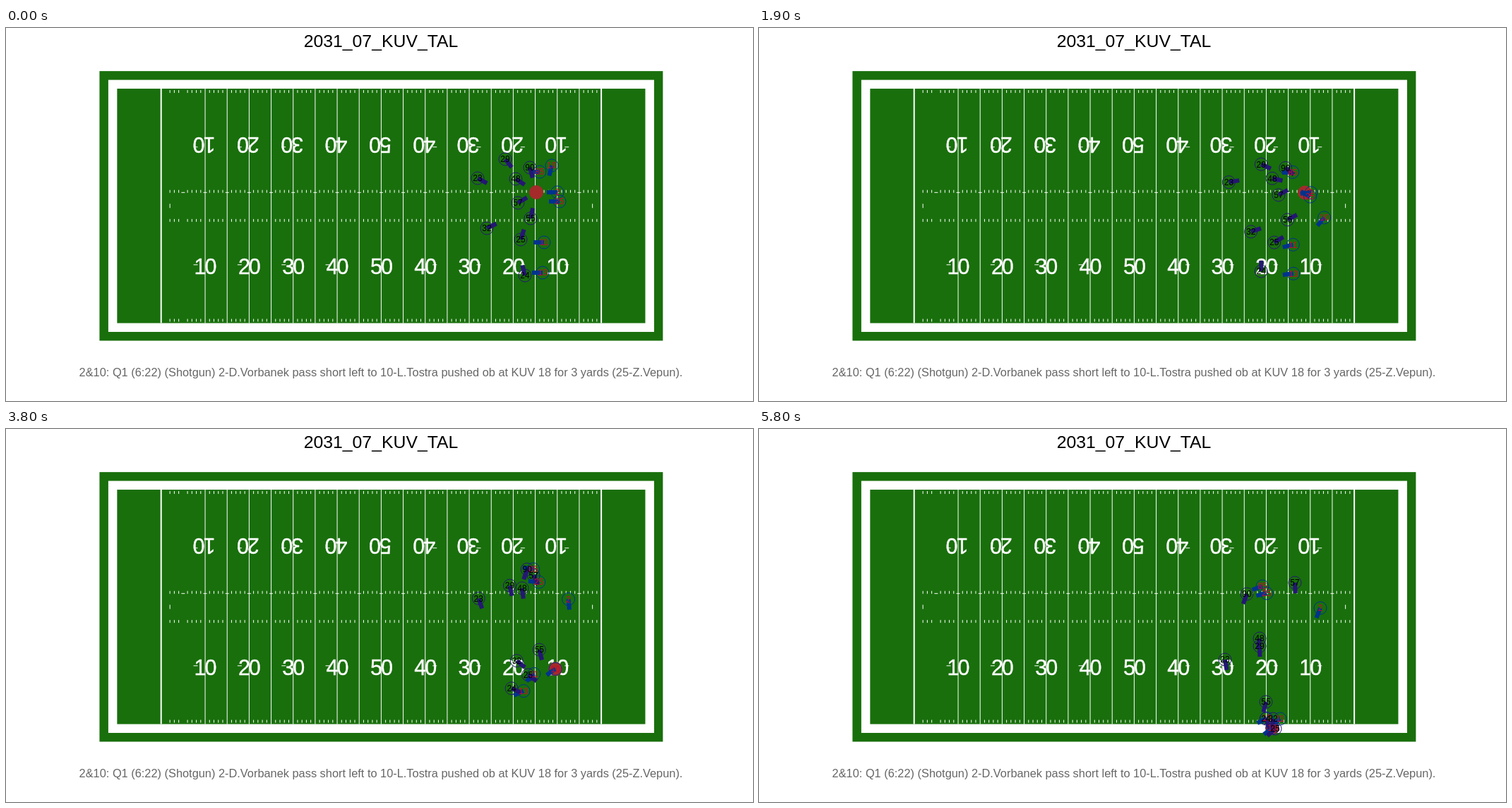
An HTML page for the animation above (5900 ms loop, 1058 by 529 pixels).

```html
<!DOCTYPE html>
<html lang="en">
<head>
<meta charset="utf-8">
<title>Play animation</title>
<style>
  html, body { margin: 0; width: 100%; height: 100%; overflow: hidden; background: #fff; }
  svg { display: block; width: 100vw; height: 100vh; }
  text { font-family: "Liberation Sans", Arial, sans-serif; text-anchor: middle; }
  .yards { font-size: 30.5px; letter-spacing: -2px; fill: #fff; stroke: #fff; stroke-width: 0.4; }
  .jersey { font-size: 12px; }
</style>
</head>
<body>
<svg id="stage" viewBox="0 0 1058 529"></svg>
<script>
const LOOP = 5900, STEP = 100;
const SNAP = 1400, PASS = 2600, CATCH = 3300, BLOCK = 4300;
const KNOTS = [0, SNAP, PASS, BLOCK, LOOP - STEP];
const YARD = 6.234, CENTER = { x: 531.4, y: 252.3 };
const GRASS = '#196f0c';
const DEFENSE = { color: '#241773', text: '#000' };
const OFFENSE = { color: '#00338d', text: '#c60c30' };
const stage = document.getElementById('stage');

function add(parent, tag, attrs = {}, text) {
  const el = document.createElementNS('http://www.w3.org/2000/svg', tag);
  for (const key in attrs) el.setAttribute(key, attrs[key]);
  if (text) el.textContent = text;
  parent.append(el);
  return el;
}

// Field, measured from its centre
const field = add(stage, 'g', { transform: `translate(${CENTER.x} ${CENTER.y})` });
const halfWidth = 60 * YARD, halfHeight = 160 / 6 * YARD;
const yardX = yard => (yard - 50) * YARD;

function turf(margin, fill) {
  const w = halfWidth + margin * YARD, h = halfHeight + margin * YARD;
  add(field, 'rect', { x: -w, y: -h, width: 2 * w, height: 2 * h, fill });
}

function line(x, y, dx, dy, width = 1) {
  add(field, 'line', { x1: x - dx, y1: y - dy, x2: x + dx, y2: y + dy, stroke: '#fff', 'stroke-width': width });
}

turf(4, GRASS);
turf(2, '#fff');
turf(0, GRASS);
for (const goal of [0, 100]) line(yardX(goal), 0, 0, halfHeight, 2);
for (const spot of [2, 98]) line(yardX(spot), 0, 0, 3);

const hashRows = [3.3 * YARD, halfHeight - 4];
for (let yard = 2; yard < 100; yard++) {
  const x = yardX(yard);
  if (yard % 5) {
    for (const y of hashRows) for (const side of [-1, 1]) line(x, side * y, 0, 2);
  } else {
    if (yard > 5) line(x, 0, 0, halfHeight);
    line(x, -19, 2.5, 0);
  }
}

for (let yard = 10; yard < 100; yard += 10) {
  const x = yardX(yard), label = String(50 - Math.abs(50 - yard));
  for (const angle of [0, 180]) {
    add(field, 'text', { class: 'yards', x: 0, y: 97, transform: `translate(${x - 0.5}) rotate(${angle})` }, label);
    if (yard !== 50) line(x + Math.sign(yard - 50) * 13.5, angle ? -83.5 : 83.5, 3, 0);
  }
}

const caption = (y, size, fill, text) =>
  add(stage, 'text', { x: 531, y, 'font-size': size, fill }, text);
caption(26.5, 24.8, '#000', '2031_07_KUV_TAL');
caption(494, 16.37, '#666',
  '2&10: Q1 (6:22) (Shotgun) 2-D.Vorbanek pass short left to 10-L.Tostra pushed ob at KUV 18 for 3 yards (25-Z.Vepun).');

// Players
const ball = add(stage, 'circle', { r: 10, fill: '#a52a2a' });
const rings = add(stage, 'g', { fill: 'none' });
const bars = add(stage, 'g', { 'stroke-width': 6 });
const jerseys = add(stage, 'g');
const players = [];

// A path has one point per knot; without the first one the player waits for the snap
function player(number, team, ...path) {
  if (path.length < KNOTS.length) path.unshift(path[0]);
  const p = {
    team, path,
    ring: add(rings, 'circle', { r: 9, stroke: team.color }),
    bar: add(bars, 'line', { x2: 15, stroke: team.color }),
    jersey: add(jerseys, 'text', { class: 'jersey', y: 4.3, fill: team.text }, number)
  };
  players.push(p);
  return p;
}

player('85', OFFENSE, [756, 204], [755, 205], [741, 197], [713, 223]);
player('25', OFFENSE, [784, 246], [771, 225], [747, 216], [719, 233]);
player('11', OFFENSE, [762, 304], [747, 318], [748, 362], [738, 411]);
player('13', OFFENSE, [760, 347], [748, 353], [728, 381], [719, 410]);
const passer = player('2', OFFENSE, [781, 233], [785, 236], [799, 244], [795, 254]);
const receiver = player('10', OFFENSE, [773, 195], [801, 250], [799, 295], [766, 360], [727, 424]);

player('90', DEFENSE, [742, 198], [752, 199], [729, 199], [691, 234]);
player('48', DEFENSE, [722, 214], [735, 212], [728, 236], [709, 297]);
player('55', DEFENSE, [743, 270], [758, 279], [753, 331], [718, 387]);
player('25', DEFENSE, [729, 300], [732, 317], [741, 365], [731, 425]);
player('29', DEFENSE, [707, 186], [709, 194], [714, 192], [713, 241], [709, 308]);
player('23', DEFENSE, [668, 213], [662, 222], [671, 213], [668, 258], [660, 327]);
player('57', DEFENSE, [725, 248], [731, 244], [743, 223], [749, 205], [759, 218]);
player('32', DEFENSE, [681, 284], [695, 286], [699, 297], [729, 346], [728, 411]);
player('24', DEFENSE, [735, 351], [718, 347], [705, 343], [719, 381], [718, 411]);

// Smooth curve through the knots that never overshoots them
function curve(v, t) {
  const last = KNOTS.length - 1;
  const i = Math.max(0, Math.min(last - 1, KNOTS.findLastIndex(knot => knot <= t)));
  const span = KNOTS[i + 1] - KNOTS[i];
  const slope = k => (v[k + 1] - v[k]) / (KNOTS[k + 1] - KNOTS[k]);
  const tangent = k => {
    if (k === 0) return slope(0);
    if (k === last) return slope(last - 1);
    const a = slope(k - 1), b = slope(k);
    return a * b > 0 ? 2 * a * b / (a + b) : 0;
  };
  const u = (t - KNOTS[i]) / span, w = 1 - u;
  return v[i] * w * w * (1 + 2 * u) + v[i + 1] * u * u * (3 - 2 * u)
    + span * u * w * (w * tangent(i) - u * tangent(i + 1));
}

const place = (p, t) => [0, 1].map(axis => curve(p.path.map(point => point[axis]), t));

function ballAt(t) {
  const glide = (from, to, start, end) => {
    const u = Math.max(0, Math.min(1, (t - start) / (end - start)));
    return from.map((v, axis) => v + (to[axis] - v) * u);
  };
  return t < PASS
    ? glide([751, 233], place(passer, t), SNAP, SNAP + 700)
    : glide(place(passer, t), place(receiver, t), PASS + STEP, CATCH);
}

// Blockers and runners look upfield, everyone else at the ball; speed turns them along their path
function heading(p, [x, y], target, t) {
  const upfield = p.team === OFFENSE && p !== passer;
  const look = upfield ? [-1, 0] : [target[0] - x, target[1] - y];
  const reach = Math.hypot(...look) || 1;
  const before = place(p, t - STEP), after = place(p, t + STEP);
  const [dx, dy] = look.map((v, axis) => v / reach + (after[axis] - before[axis]) / 6);
  return Math.atan2(dy, dx) * 180 / Math.PI;
}

function draw() {
  const t = Math.floor(performance.now() % LOOP / STEP) * STEP;
  const target = ballAt(t);
  for (const p of players) {
    const spot = place(p, t), move = `translate(${spot})`;
    p.ring.setAttribute('transform', move);
    p.jersey.setAttribute('transform', move);
    p.bar.setAttribute('transform', `${move} rotate(${heading(p, spot, target, t)})`);
  }
  ball.setAttribute('transform', `translate(${target})`);
  requestAnimationFrame(draw);
}
draw();
</script>
</body>
</html>
```
